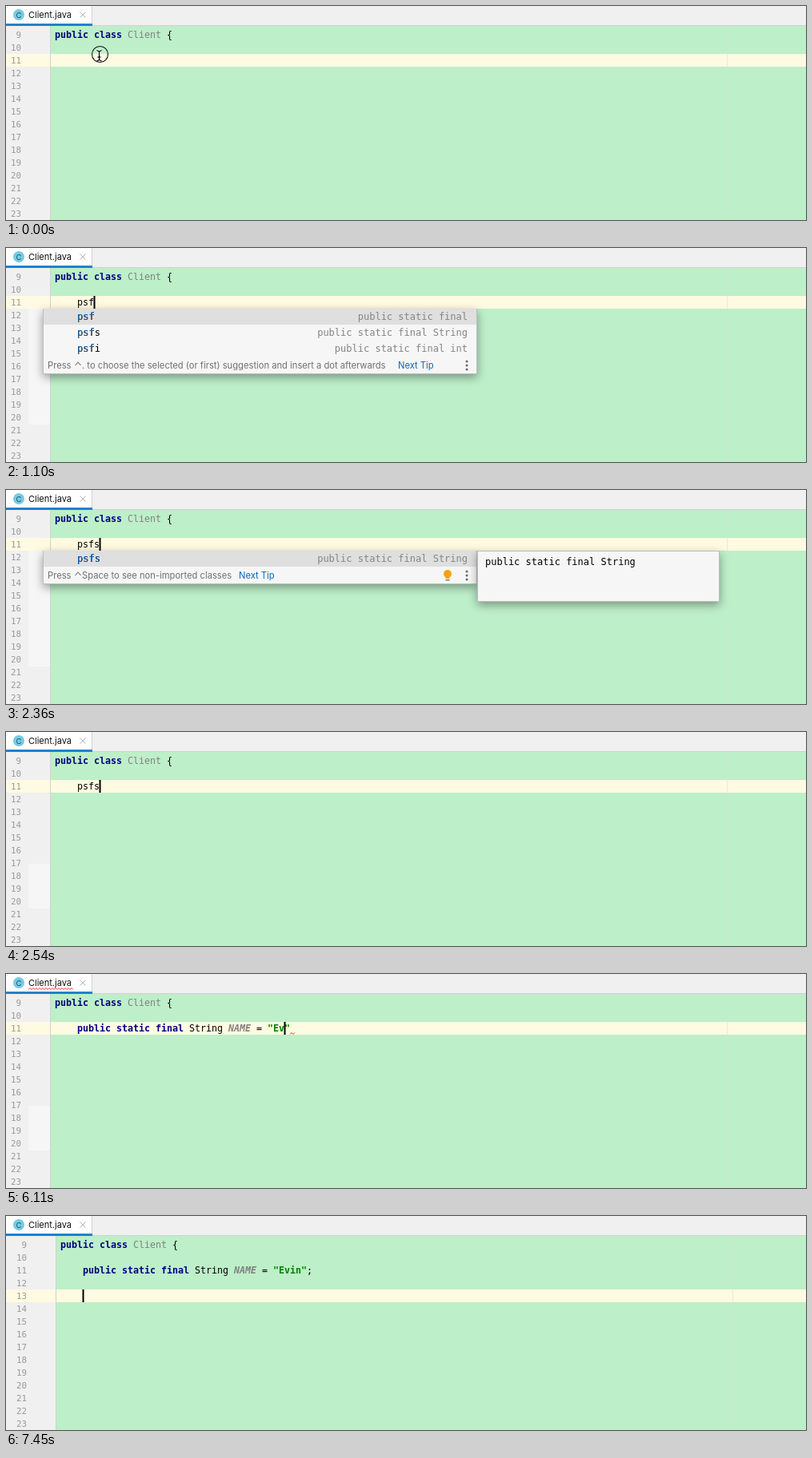
Animation of 1000x268 px, one loop 8 s. Source, as an HTML page with a canvas:

```html
<!DOCTYPE html>
<html lang="en">
<head>
<meta charset="utf-8">
<title>Editor</title>
<style>
html, body { margin: 0; width: 100%; height: 100%; overflow: hidden; background: #bdefc9; }
canvas { display: block; width: 1000px; height: 268px; }
</style>
</head>
<body>
<canvas id="stage"></canvas>
<script>
const W = 1000, H = 268, LOOP = 8000;
const CH = 7, ROW = 16;
const MONO = '"DejaVu Sans Mono", "Liberation Mono", monospace';
const SANS = 'Inter, Roboto, sans-serif';
const CODE = '11.63px ' + MONO, BOLD = 'bold ' + CODE, ITALIC = 'italic ' + BOLD;
const LOOKUP = '12px ' + MONO, UI = '11.2px ' + SANS;
const NAVY = '#000080', GREY = '#808080', GREEN = '#008000', LINK = '#1067b8', RED = '#e8302a';

const canvas = document.getElementById('stage');
const dpr = window.devicePixelRatio || 1;
canvas.width = W * dpr;
canvas.height = H * dpr;
const c = canvas.getContext('2d');

const DECL = 'public static final ';
const TAIL = 'NAME = "Evin";';
const KEYS = [3170, 3260, 3440, 3660, 4320, 4400, 4490, 5300, 5660, 6110, 6290, 6470, 6730, 7000];
const ABBR = [750, 930, 1100, 1190];
const TEMPLATES = [
  ['psf', 'public static final'],
  ['psfs', 'public static final String'],
  ['psfi', 'public static final int'],
  ['psvm', 'main() method declaration'],
  ['prsf', 'private static final']
];

const count = (times, t) => times.filter(k => t >= k).length;
const within = (t, a, b) => t >= a && t < b;
const baseline = line => 40 + (line - 9) * ROW;

function box(x, y, w, h, color) {
  c.fillStyle = color;
  c.fillRect(x, y, w, h);
}

function text(s, x, y, font, color, align = 'left') {
  c.font = font;
  c.fillStyle = color;
  c.textAlign = align;
  c.fillText(s, x, y);
}

function disc(x, y, r, color) {
  c.fillStyle = color;
  c.beginPath();
  c.arc(x, y, r, 0, Math.PI * 2);
  c.fill();
}

function path(points, color, width = 1) {
  c.strokeStyle = color;
  c.lineWidth = width;
  c.beginPath();
  points.forEach(([x, y]) => c.lineTo(x, y));
  c.stroke();
}

// Draws [text, font, color] tokens on the character grid
function tokens(x, line, list) {
  for (const [s, font, color] of list) {
    text(s, x, baseline(line), font, color);
    x += s.length * CH;
  }
}

function squiggle(x, y, w) {
  const pts = [];
  for (let i = 0; i <= w; i += 2) pts.push([x + i, y + (i % 4 ? 0.5 : 2.5)]);
  path(pts, RED);
}

function drawTabs(error) {
  box(0, 0, W, 24, '#f0f0f0');
  box(0, 24, W, 1, '#d1d1d1');
  box(0, 0, 107, 22, '#fff');
  box(107, 0, 1, 24, '#d1d1d1');
  box(0, 22, 108, 3, '#2380cc');
  disc(16, 11, 7, '#74cbe6');
  text('C', 16, 14.5, '9.5px ' + SANS, '#28505e', 'center');
  text('Client.java', 28, 15, '11px ' + SANS, '#111');
  path([[92.5, 7.5], [99.5, 14.5]], '#b4b4b4');
  path([[99.5, 7.5], [92.5, 14.5]], '#b4b4b4');
  if (error) squiggle(28, 17, 56);
}

function drawEditor(t, shift, line) {
  const edge = 55 + shift;
  box(0, 25, W, H, '#bdefc9');
  box(0, 25, edge, H, '#f0f0f0');
  if (within(t, 1010, 2540)) box(28, 76, 27, 145, '#f6f6f6');
  if (within(t, 2540, 7360)) box(28, 165, 27, 56, '#f6f6f6');
  box(0, 28 + (line - 9) * ROW, W, ROW, '#fffae1');
  box(edge, 25, 1, H, '#cdd3ce');
  box(901 + shift, 25, 1, H, 'rgba(218,222,218,.6)');
  for (let n = 9; n <= 23; n++) {
    text(n, 19 + shift, baseline(n), '10.8px ' + MONO, '#999', 'right');
  }
  tokens(61 + shift, 9, [
    ['public class ', BOLD, NAVY], ['Client', CODE, GREY], [' {', CODE, '#000']
  ]);
}

function drawCaret(x, line) {
  box(x - 0.5, 28 + (line - 9) * ROW, 2, ROW, '#000');
}

function drawField(t, x, n) {
  const shown = n >= 8 && n < 13 ? n + 1 : n;
  const tail = n >= 8 && n < 13 ? TAIL.slice(0, n) + '"' : TAIL.slice(0, n);
  const grey = [0, 2, 3, 4][count([3350, 3530, 4020], t)];
  const start = x + (DECL.length + 7) * CH;
  tokens(x, 11, [
    [DECL, BOLD, NAVY], ['String ', CODE, '#000'],
    [tail.slice(0, Math.min(grey, 4)), t >= 4670 ? ITALIC : CODE, GREY],
    [tail.slice(Math.min(grey, 4), 7), CODE, '#000'],
    [tail.slice(7, 13), BOLD, GREEN], [tail.slice(13), CODE, '#000']
  ]);
  if (within(t, 2900, 7180)) {
    const col = t < 3350 ? -1 : within(t, 4670, 5660) ? 6 : shown;
    squiggle(start + col * CH, 73, 6);
  }
  return start + n * CH;
}

function panel(x, y, w, h, color) {
  c.save();
  c.shadowColor = 'rgba(0,0,0,.38)';
  c.shadowBlur = 11 * dpr;
  c.shadowOffsetY = 4 * dpr;
  box(x, y, w, h, color);
  c.restore();
  c.strokeStyle = '#bcbfbc';
  c.lineWidth = 1;
  c.strokeRect(x + 0.5, y + 0.5, w - 1, h - 1);
}

function drawLookup(rows, prefix, footer, linkX, bulb) {
  const h = rows.length * 20 + 22, foot = 76 + h - 22;
  panel(46, 76, 543, h, '#f6f6f6');
  box(47, 76, 541, 20, '#dfdfdf');
  rows.forEach(([abbr, desc], i) => {
    const y = 90 + i * 20;
    text(abbr, 89, y, LOOKUP, '#000');
    const hit = abbr.startsWith(prefix) ? prefix : abbr[0];
    text(hit, 89, y, LOOKUP, LINK);
    text(desc, 577, y, LOOKUP, '#848484', 'right');
  });
  const y = foot + 15;
  text('Press', 52, y, UI, '#707070');
  path([[86.5, y - 4], [90, y - 8], [93.5, y - 4]], '#707070', 1.1);
  text(footer, 95, y, UI, '#707070');
  text('Next Tip', linkX, y, UI, LINK);
  for (const dy of [6, 11, 16]) disc(576, foot + dy, 1.5, '#6a6a6a');
  if (bulb) {
    disc(552, foot + 9, 5, '#f5a30a');
    box(549.5, foot + 12, 5, 3, '#f5a30a');
    box(549.5, foot + 16, 5, 1.5, '#7a7a7a');
  }
}

function drawPopups(t) {
  const dotTip = '. to choose the selected (or first) suggestion and insert a dot afterwards';
  if (within(t, 1010, 1100)) drawLookup(TEMPLATES, 'ps', dotTip, 490);
  if (within(t, 1100, 1280)) drawLookup(TEMPLATES.slice(0, 3), 'psf', dotTip, 490);
  if (within(t, 1280, 2540)) {
    drawLookup(TEMPLATES.slice(1, 2), 'psfs', 'Space to see non-imported classes', 291, t >= 1820);
  }
  if (within(t, 2360, 2540)) {
    panel(589, 76, 303, 64, '#f6f6f6');
    text(TEMPLATES[1][1], 599, 94, LOOKUP, '#000');
  }
}

function drawPointer(ring) {
  const beam = [[113.5, 55.5], [116.5, 57], [119.5, 55.5]];
  const foot = [[113.5, 69], [116.5, 67.5], [119.5, 69]];
  for (const [color, width] of [['rgba(255,255,255,.8)', 3], ['#000', 1.2]]) {
    path(beam, color, width);
    path([[116.5, 57], [116.5, 67.5]], color, width);
    path(foot, color, width);
    path([[114.5, 64], [118.5, 64]], color, width);
  }
  if (ring) {
    c.strokeStyle = '#111';
    c.lineWidth = 1.1;
    c.beginPath();
    c.arc(117.5, 60.5, 10, 0, Math.PI * 2);
    c.stroke();
  }
}

function draw(t) {
  const shift = t >= 7360 ? CH : 0;
  const line = 11 + count([7360, 7450], t);
  const x = 89 + shift;
  c.setTransform(dpr, 0, 0, dpr, 0, 0);
  drawEditor(t, shift, line);
  drawTabs(within(t, 3350, 7090));

  let caret;
  if (t < 2630) {
    const n = count(ABBR, t);
    tokens(x, 11, [['psfs'.slice(0, n), CODE, '#000']]);
    caret = x + n * CH;
  } else {
    caret = drawField(t, x, count(KEYS, t));
  }
  if (line > 11) caret = x;
  if (t >= 300 && !within(t, 1820, 2270)) drawCaret(caret, line);
  drawPopups(t);
  if (t < 750) drawPointer(t < 120);
}

const t0 = performance.now();
function tick() {
  draw((performance.now() - t0) % LOOP);
  requestAnimationFrame(tick);
}
tick();
</script>
</body>
</html>
```
